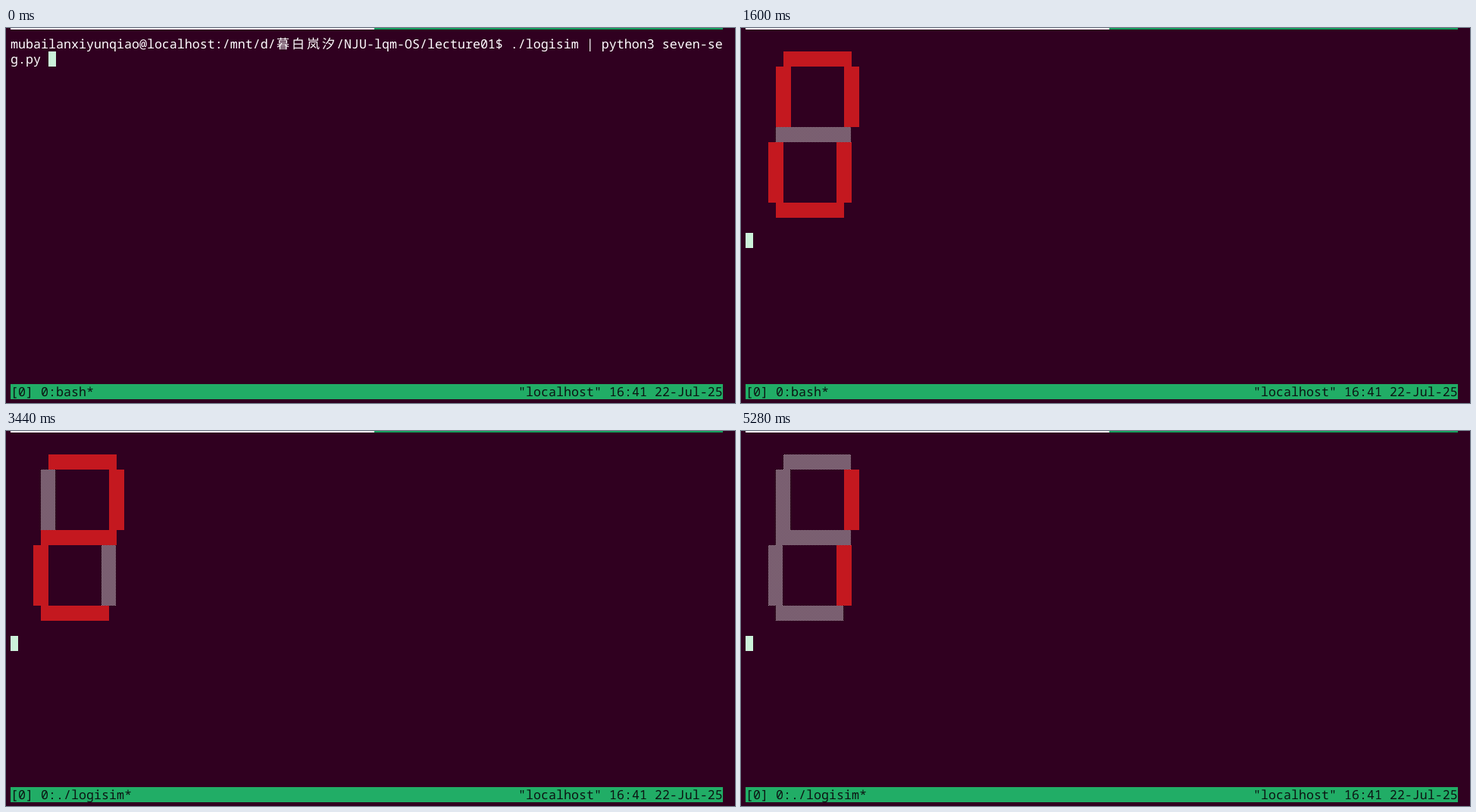
An HTML page for the animation above (5360 ms loop, 962 by 496 pixels).

```html
<!DOCTYPE html>
<html lang="en">
<head>
<meta charset="utf-8">
<title>Seven-segment terminal</title>
<style>
  html, body { margin: 0; width: 100%; height: 100%; overflow: hidden; background: #300020; }
  svg { display: block; }
  rect { shape-rendering: crispEdges; }
  /* 0.6em advance: exactly one 10px terminal column */
  text {
    font: 500 16.6667px "Noto Sans Mono", "DejaVu Sans Mono", monospace;
    text-rendering: geometricPrecision;
    white-space: pre;
    fill: #fff;
  }
  .cjk { font: 500 17px "Noto Sans CJK SC", "Noto Sans CJK", sans-serif; letter-spacing: 3px; }
  .bar text { fill: #0c1413; }
</style>
</head>
<body>
<svg id="stage" width="962" height="496" viewBox="0 0 962 496">
  <defs>
    <pattern id="shade" width="2" height="2" patternUnits="userSpaceOnUse">
      <rect width="1" height="1" fill="#c4bec1"/>
      <rect x="1" y="1" width="1" height="1" fill="#c4bec1"/>
    </pattern>
  </defs>
  <rect width="962" height="496" fill="#300020"/>
  <rect x="6" width="480" height="2" fill="#fff"/>
  <rect x="486" width="460" height="2" fill="#159e5c"/>
  <g id="prompt">
    <text x="6" y="27">mubailanxiyunqiao@localhost:/mnt/d/</text>
    <text x="357" y="27" class="cjk">暮白岚汐</text>
    <text x="436" y="27">/NJU-lqm-OS/lecture01$ ./logisim | python3 seven-se</text>
    <text x="6" y="47">g.py</text>
  </g>
  <g id="digit"></g>
  <rect id="cursor" width="10" height="20" fill="#ccf2da"/>
  <g class="bar">
    <rect x="6" y="471" width="940" height="20" fill="#21ad66"/>
    <text id="job" x="6" y="487"></text>
    <text x="676" y="487">"localhost" 16:41 22-Jul-25</text>
  </g>
</svg>
<script>
const LOOP = 5360;
const RED = '#c4181f';
const $ = id => document.getElementById(id);

// Segments a to g: x, y, width, height
const SEGMENTS = {
  a: [56, 31, 90, 20],
  b: [136, 51, 20, 80],
  c: [126, 151, 20, 80],
  d: [46, 231, 90, 20],
  e: [36, 151, 20, 80],
  f: [46, 51, 20, 80],
  g: [46, 131, 100, 20]
};
const LIT = ['abcdef', 'bc', 'abged'];

const STEPS = [
  { at: 0, digit: null, job: 'bash' },
  { at: 160, digit: 0, job: 'bash' },
  { at: 1840, digit: 1, job: './logisim' },
  { at: 2880, digit: 2, job: './logisim' },
  { at: 3840, digit: 0, job: './logisim' },
  { at: 4880, digit: 1, job: './logisim' }
];

function setAttrs(el, attrs) {
  for (const [key, value] of Object.entries(attrs)) el.setAttribute(key, value);
}

const segments = Object.entries(SEGMENTS).map(([name, [x, y, width, height]]) => {
  const el = document.createElementNS('http://www.w3.org/2000/svg', 'rect');
  setAttrs(el, { x, y, width, height });
  $('digit').append(el);
  return { name, el, width };
});

function show({ digit, job }) {
  const typing = digit === null;
  setAttrs($('prompt'), { visibility: typing ? 'visible' : 'hidden' });
  setAttrs($('digit'), { visibility: typing ? 'hidden' : 'visible' });
  setAttrs($('cursor'), typing ? { x: 56, y: 31 } : { x: 6, y: 271 });
  $('job').textContent = `[0] 0:${job}*`;
  if (typing) return;
  for (const { name, el, width } of segments) {
    const on = LIT[digit].includes(name);
    setAttrs(el, { fill: on ? RED : 'url(#shade)', width: on ? width : width - 1 });
  }
}

const start = performance.now();
let current;

function tick() {
  const t = (performance.now() - start) % LOOP;
  const step = STEPS.findLast(s => s.at <= t);
  if (step !== current) show(current = step);
  requestAnimationFrame(tick);
}
tick();
</script>
</body>
</html>
```
